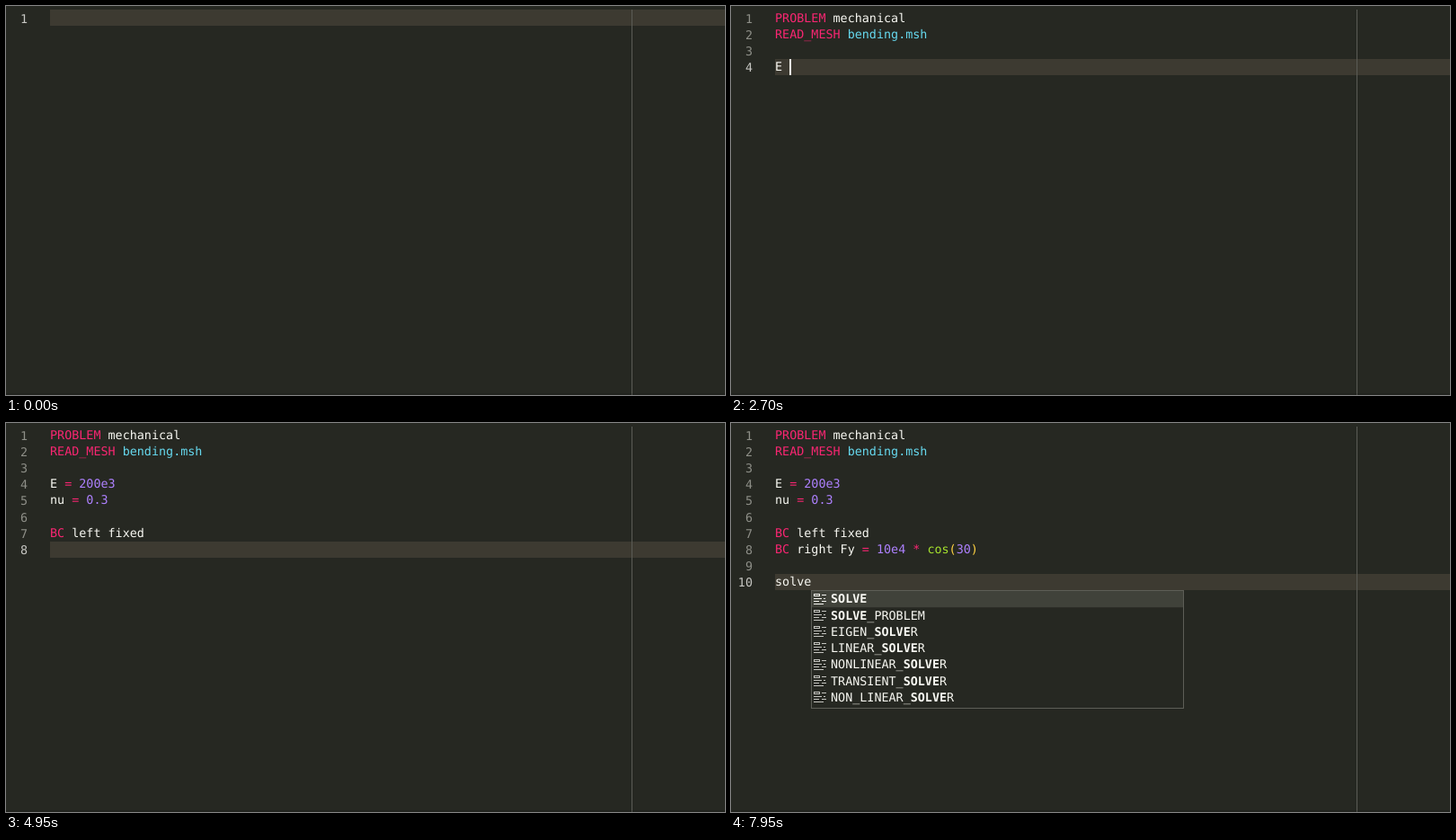
Animation, 800 px wide and 433 px high, one loop 8000 ms. Source, as an HTML page with a canvas:

```html
<!DOCTYPE html>
<html lang="en">
<head>
<meta charset="utf-8">
<title>Typing an input file</title>
<style>
html, body { margin: 0; width: 100%; height: 100%; overflow: hidden; background: #262822; }
canvas { display: block; width: 800px; height: 433px; }
</style>
</head>
<body>
<canvas id="stage"></canvas>
<script>
const W = 800, H = 433, LOOP = 8000;
const LEFT = 49, TOP = 4, ROW = 18.22, CH = 8.067;
const FONT = '13.4px "DejaVu Sans Mono", monospace';
const MAX_ITEMS = 12, POPUP_W = 415, BLINK = 100;

const canvas = document.getElementById('stage');
const ctx = canvas.getContext('2d');
const dpr = window.devicePixelRatio || 1;
canvas.width = W * dpr;
canvas.height = H * dpr;
ctx.scale(dpr, dpr);
ctx.textRendering = 'geometricPrecision';

// Bursts of typing: start, gap between keys, text.
const bursts = [
  [50, 50, 'PROBLEM mechanica'], [850, 0, 'l'],
  [950, 50, '\nREAD'], [1250, 50, '_MESH '], [1600, 100, 'be'],
  [1800, 50, 'nding.msh'], [2350, 100, '\n\n'],
  [2650, 50, 'E = 200e3'], [3150, 50, '\nnu = '], [3500, 0, '0'], [3600, 50, '.3'],
  [3750, 100, '\n\n'], [3950, 50, 'BC left'], [4400, 50, ' fixed'], [4850, 0, '\n'],
  [5050, 50, 'BC right F'], [5650, 50, 'y = '], [5900, 50, '10e4'], [6150, 75, ' * '],
  [6500, 50, 'cos'], [6800, 0, '('], [6900, 80, '30'], [7100, 0, ')'],
  [7300, 130, '\n\n'], [7750, 25, 'solve']
];
const keys = bursts.flatMap(([start, gap, text]) =>
  [...text].map((char, i) => ({ time: start + i * gap, char })));

const functions = 'abs ceil clock cos cosh cpu_time exp floor lag log max min not random round sin sinh sqrt'.split(' ');
const plainWords = ['fixed'];
const keywords = `ABSTOL BAR_TYPE BASE BC BLOCK_SIZE BREAK BY_NODE CARTESIAN CHECK CLOSE COLS COLUMNS
  COMMAND COMPUTE CONTINUE DATA_FILE DIMENSIONS EIGEN_SOLVER ELEMENT ELSE END ENDIF EPSILON EQUAL ERROR
  EXPLICIT EXPORT EXPRESSION EXTERNAL FILE FILE_FORMAT FILE_PATH FIND_EXTREMA FIT FOR FORMAT FROM
  FUNCTION FUNCTION_DATA GROUP IMPLICIT INITIAL_CONDITIONS INITIAL_CONDITIONS_MODE INPUT_FILE
  INTEGRATE LABEL LIMIT LINE LINEAR LINEAR_SOLVER LOAD LOADER LOWER MATERIAL MATRIX MAX MESH MIN
  MODEL NAME NEAREST NODES NON_LINEAR_SOLVER NONE NONLINEAR_SOLVER NORM NORMAL NOT NUMBER NUMERIC
  NX OUTPUT_FILE PARAMETRIC PATH PETSC_OPTIONS PHASE_SPACE PHYSICAL_GROUP POINT PRECONDITIONER
  PRINT PRINT_FUNCTION PRINT_VECTOR PROBLEM PROPERTY RANGE READ READ_MESH RELTOL REORDER RESULT
  ROUND ROWS SCALE SIZE SOLVE SOLVE_PROBLEM SORT STATIC STEP STEPS SUM TIME TRANSIENT_SOLVER
  VALUE VECTOR WRITE_MESH WRITE_RESULTS`.split(/\s+/);
const dictionary = [
  ...keywords.map(word => ({ word, kind: 'keyword' })),
  ...plainWords.map(word => ({ word, kind: 'text' })),
  ...functions.map(word => ({ word, kind: 'function' }))
];

// Indices of the matched letters, beginning at the start of a word part.
function match(word, query) {
  const low = word.toLowerCase();
  for (let start = 0; start < low.length; start++) {
    if (start && low[start - 1] !== '_' || low[start] !== query[0]) continue;
    const hits = [start];
    for (const c of query.slice(1)) {
      const next = low.indexOf(c, hits[hits.length - 1] + 1);
      if (next < 0) break;
      hits.push(next);
    }
    if (hits.length === query.length) return hits;
  }
  return null;
}

const suggestCache = {};
function suggest(query) {
  if (suggestCache[query]) return suggestCache[query];
  const found = [];
  for (const entry of dictionary) {
    const hits = match(entry.word, query.toLowerCase());
    if (!hits) continue;
    let run = 1;
    while (hits[run] === hits[0] + run) run++;
    const otherCase = entry.word[hits[0]] === query[0] ? 0 : 1;
    found.push({ ...entry, hits, run, otherCase });
  }
  found.sort((a, b) => a.hits[0] - b.hits[0] || b.run - a.run || a.otherCase - b.otherCase);
  return suggestCache[query] = found;
}

function rect(x, y, w, h, color) {
  ctx.fillStyle = color;
  ctx.fillRect(x, y, w, h);
}

function write(text, x, y, color, isBold = () => false) {
  ctx.fillStyle = color;
  [...text].forEach((c, i) => {
    ctx.font = (isBold(i) ? 'bold ' : '') + FONT;
    ctx.fillText(c, x + i * CH, y);
  });
}

const syntax = [
  [/^(PROBLEM|READ_MESH|BC)\b/, '#f92672'],
  [/^\w+\.msh/, '#66d9ef'],
  [/^\d[\d.]*(e\d*)?/, '#ae81ff'],
  [/^cos\b/, '#a6e22e'],
  [/^[=*]/, '#f92672'],
  [/^[()]/, '#ffd242'],
  [/^(\w+|\s+|.)/, '#f8f8f2']
];

function writeCode(line, y) {
  let col = 0;
  while (col < line.length) {
    const rest = line.slice(col);
    const [rule, color] = syntax.find(([re]) => re.test(rest));
    const token = rest.match(rule)[0];
    write(token, LEFT + col * CH, y, color);
    col += token.length;
  }
}

function drawIcon(kind, x, y, selected) {
  const light = selected ? '#f8f8f2' : '#c5c5c0';
  ctx.lineWidth = 1;
  if (kind === 'keyword') {
    const bars = [[10, 3, 5], [1, 7, 9], [12, 7, 2], [1, 10, 6], [10, 10, 5], [1, 13, 11]];
    for (const [bx, by, w] of bars) rect(x + bx, y + by, w, 1, light);
    ctx.strokeStyle = light;
    ctx.strokeRect(x + 1.5, y + 2.5, 6, 2);
  } else if (kind === 'function') {
    ctx.strokeStyle = selected ? light : '#b180d7';
    ctx.beginPath();
    [[8, 1.5], [13.5, 4.5], [13.5, 11], [8, 14.5], [2.5, 11], [2.5, 4.5]]
      .forEach(([px, py]) => ctx.lineTo(x + px, y + py));
    ctx.closePath();
    ctx.moveTo(x + 2.5, y + 4.5);
    ctx.lineTo(x + 8, y + 7.5);
    ctx.lineTo(x + 13.5, y + 4.5);
    ctx.moveTo(x + 8, y + 7.5);
    ctx.lineTo(x + 8, y + 14.5);
    ctx.stroke();
  } else {
    ctx.fillStyle = light;
    ctx.font = '8.5px "DejaVu Sans", sans-serif';
    ctx.fillText('abc', x + 0.8, y + 11.5);
  }
}

function drawPopup(items, left, top) {
  const shown = items.slice(0, MAX_ITEMS);
  const x = Math.round(left), y = Math.round(top);
  const h = Math.round(shown.length * ROW + 4);
  rect(x, y, POPUP_W, h, '#262822');
  rect(x + 1, y + 1, POPUP_W - 2, ROW, '#40423a');
  if (items.length > MAX_ITEMS) rect(x + POPUP_W - 11, y + 1, 10, 99, 'rgba(121,121,121,.3)');
  shown.forEach((item, i) => {
    const itemTop = y + 0.8 + i * ROW;
    drawIcon(item.kind, x + 2, Math.round(itemTop + 1), i === 0);
    write(item.word, x + 22, itemTop + 13.6, '#f8f8f2', k => item.hits.includes(k));
  });
  ctx.strokeStyle = '#5d5e57';
  ctx.lineWidth = 1;
  ctx.strokeRect(x + 0.5, y + 0.5, POPUP_W - 1, h - 1);
}

function draw(time) {
  const now = time + 15;
  const typed = keys.filter(k => k.time <= now);
  const lastKey = typed.length ? typed[typed.length - 1].time : -BLINK;
  const lines = typed.map(k => k.char).join('').split('\n');
  const row = lines.length - 1;
  const current = lines[row];
  const rowTop = TOP + row * ROW;
  const caret = LEFT + current.length * CH;
  if (current.includes('(') && !current.includes(')')) lines[row] += ')';

  rect(0, 0, W, H, '#262822');
  const y0 = Math.round(rowTop), y1 = Math.round(rowTop + ROW);
  rect(LEFT, y0, W - LEFT, y1 - y0, '#3d3a31');
  rect(696, TOP, 1, H - TOP, '#5b5c56');

  lines.forEach((line, i) => {
    const base = TOP + i * ROW + 13.5, label = String(i + 1);
    write(label, 24 - label.length * CH, base + 1, i === row ? '#c8c8c4' : '#8e8f88');
    writeCode(line, base);
  });

  const word = current.match(/(?:^|[^\w.])([A-Za-z_]\w*)$/);
  const items = word ? suggest(word[1]) : [];
  if (items.length) drawPopup(items, caret, rowTop + ROW);

  const blinkOn = Math.floor((now - lastKey) / BLINK) % 2 === 0;
  if (blinkOn && typed.length) rect(Math.round(caret), y0, 2, y1 - y0, '#f8f8f0');
  rect(0, H - 2, W, 2, 'rgba(0,0,0,.12)');
}

function tick() {
  draw(performance.now() % LOOP);
  requestAnimationFrame(tick);
}
tick();
</script>
</body>
</html>
```
